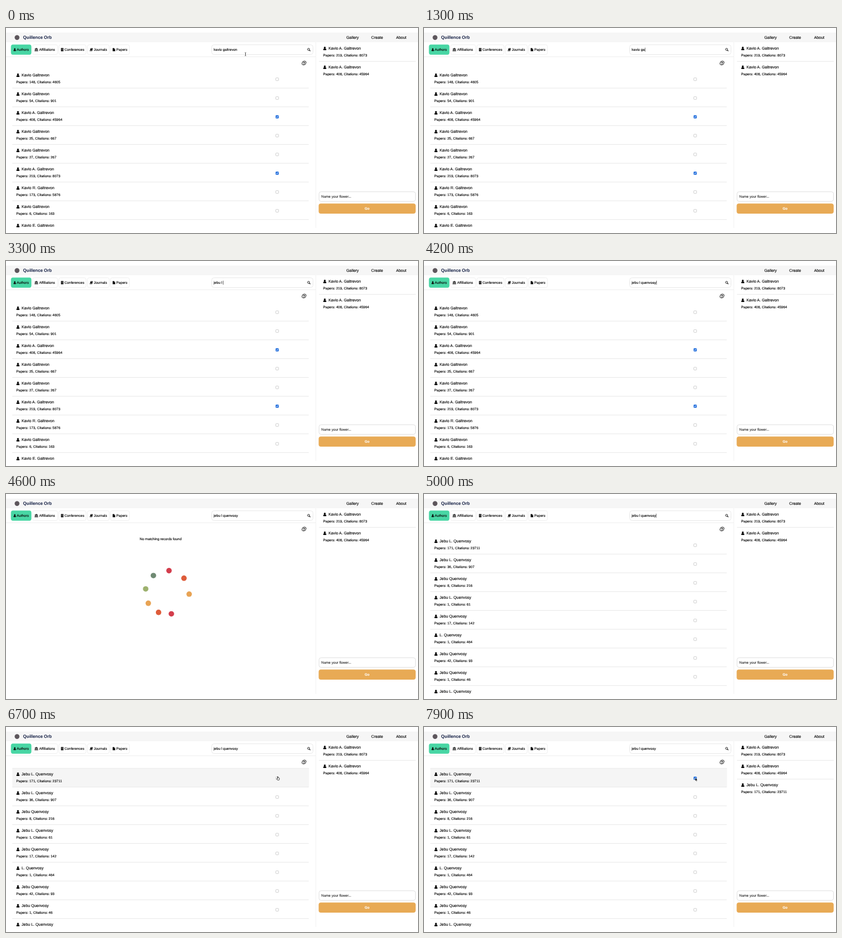
Write an HTML page with a canvas that moves like this. It is 720 by 360 pixels and loops after 8 s.

```html
<!DOCTYPE html>
<html lang="en">
<head>
<meta charset="utf-8">
<title>Author search</title>
<style>
html, body { margin: 0; width: 100%; height: 100%; overflow: hidden; background: #fff; }
canvas { display: block; width: 100vw; height: 100vh; }
</style>
</head>
<body>
<canvas id="stage"></canvas>
<script>
const W = 720, H = 360, LOOP = 8000;
const canvas = document.getElementById('stage');
const ctx = canvas.getContext('2d');
const FONT = '"Liberation Sans", Arial, sans-serif';
const INK = '#0a0a0a', RULE = '#e9e9e9', BORDER = '#e4e4e4';
const NAME = 6.85, BODY = 6.1;

const FIRST = 'Kavio', LAST = 'Galtrevon';
const firstResults = [
  ['', 148, 4605], ['', 54, 901], ['A. ', 408, 45964], ['', 25, 667], ['', 27, 267],
  ['A. ', 219, 8073], ['R. ', 173, 5876], ['', 6, 163], ['E. ', 12, 310]
].map(([mid, papers, cites]) => ({ name: `${FIRST} ${mid}${LAST}`, papers, cites }));
const secondResults = [
  ['Jebu L.', 171, 23711], ['Jebu L.', 36, 907], ['Jebu', 8, 216], ['Jebu L.', 1, 61], ['Jebu', 17, 142],
  ['L.', 1, 464], ['Jebu', 42, 93], ['Jebu', 1, 46], ['Jebu L.', 2, 18]
].map(([given, papers, cites]) => ({ name: `${given} Quenvosy`, papers, cites }));

const OLD_QUERY = 'kavio galtrevon';
const TYPED = 'jebu l quenvoay';
const KEY_TIMES = [1800, 1900, 2000, 2200, 2300, 2800, 3200, 3400, 3600, 3700, 3800, 3900, 4000, 4100, 4200];
const T = { focus: 400, erase: 1000, erased: 1600, load: 4500, loaded: 4800, pointer: 5400, arrive: 6300, check: 7400 };

// A hairline outline gives the small text its slightly heavier weight.
function text(str, x, y, size = BODY, color = INK, weight = 'normal', align = 'left') {
  ctx.font = `${weight} ${size}px ${FONT}`;
  ctx.textRendering = 'geometricPrecision';
  ctx.textAlign = align;
  ctx.fillStyle = ctx.strokeStyle = color;
  ctx.lineWidth = 0.14;
  ctx.fillText(str, x, y);
  ctx.strokeText(str, x, y);
}

function rect(x, y, w, h, color) {
  ctx.fillStyle = color;
  ctx.fillRect(x, y, w, h);
}

function box(x, y, w, h, r, fill, stroke) {
  ctx.beginPath();
  ctx.roundRect(x, y, w, h, r);
  if (fill) { ctx.fillStyle = fill; ctx.fill(); }
  if (stroke) { ctx.strokeStyle = stroke; ctx.lineWidth = 0.8; ctx.stroke(); }
}

function dot(x, y, r, color) {
  ctx.fillStyle = color;
  ctx.beginPath();
  ctx.arc(x, y, r, 0, Math.PI * 2);
  ctx.fill();
}

function path(points, color, width, fill) {
  ctx.beginPath();
  points.forEach(([x, y], i) => i ? ctx.lineTo(x, y) : ctx.moveTo(x, y));
  if (fill) { ctx.closePath(); ctx.fillStyle = fill; ctx.fill(); }
  if (width) { ctx.strokeStyle = color; ctx.lineWidth = width; ctx.stroke(); }
}

function at(x, y, scale, draw) {
  ctx.save();
  ctx.translate(x, y);
  ctx.scale(scale, scale);
  draw();
  ctx.restore();
}

// Icons are drawn around their own centre.
const icons = {
  user() {
    dot(0, -1.5, 1.65, INK);
    box(-2.75, 0, 5.5, 3, [1.9, 1.9, 0.9, 0.9], INK);
  },
  bank() {
    path([[-3.3, -1.3], [0, -3.1], [3.3, -1.3]], '', 0, INK);
    for (const x of [-2.5, -0.6, 1.3]) rect(x, -1.2, 1.2, 2.6, INK);
    rect(-3.3, 1.6, 6.6, 1.2, INK);
  },
  building() {
    rect(-2.3, -3, 4.6, 6, INK);
    for (const y of [-2, -0.6, 0.8]) for (const x of [-1.3, 0.5]) rect(x, y, 0.8, 0.7, '#fff');
  },
  book() {
    path([[-1.2, -2.6], [3, -2.6], [1.6, 2.5], [-2.9, 2.5]], '', 0, INK);
    path([[-0.4, -1.3], [1.6, -1.3]], '#fff', 0.5);
    path([[-2.1, 1.5], [1.1, 1.5]], '#fff', 0.5);
  },
  file() {
    path([[-2.3, -3], [0.4, -3], [0.4, -0.8], [2.4, -0.8], [2.4, 3], [-2.3, 3]], '', 0, INK);
    path([[0.9, -3], [2.4, -1.4], [0.9, -1.4]], '', 0, INK);
  },
  search() {
    ctx.beginPath();
    ctx.arc(-0.5, -0.5, 1.8, 0, Math.PI * 2);
    ctx.strokeStyle = INK;
    ctx.lineWidth = 0.9;
    ctx.stroke();
    path([[0.9, 0.9], [2.5, 2.5]], INK, 1.1);
  },
  help() {
    ctx.transform(1, 0, -0.2, 1, 0, 0);
    ctx.beginPath();
    ctx.arc(0, 0, 3.4, 0, Math.PI * 2);
    ctx.strokeStyle = INK;
    ctx.lineWidth = 0.9;
    ctx.stroke();
    text('?', 0, 2.1, 6, INK, 'bold', 'center');
  }
};
const icon = (name, x, y, scale = 1) => at(x, y, scale, icons[name]);

function header() {
  rect(0, 8, W, 17, '#f6f6f6');
  dot(19.3, 16.8, 4.2, '#5d565c');
  text('Quillence Orb', 29.8, 19.3, 7.65, '#2b3556', 'bold');
  text('Gallery', 594.8, 19.1, NAME);
  text('Create', 638.2, 19.1, NAME);
  text('About', 681.7, 19.1, NAME);
}

function toolbar() {
  const tabs = [
    ['Authors', 9, 35, 15.3, 18.8, 'user'], ['Affiliations', 46.4, 43.8, 53, 58, 'bank'],
    ['Conferences', 92.4, 47.4, 98.2, 102.2, 'building'], ['Journals', 142.4, 38, 149, 153.4, 'book'],
    ['Papers', 182.7, 33, 188.6, 192.8, 'file']
  ];
  tabs.forEach(([label, x, w, iconX, textX, glyph], i) => {
    box(x, 29.4, w, 17.2, 3, i ? '#fff' : '#48d6a4', i ? '#ebebeb' : '#48d6a4');
    icon(glyph, iconX, 38, i ? 0.95 : 0.8);
    text(label, textX, 40.2);
  });
  box(359.5, 29.5, 177, 17, 4, '#fff', BORDER);
  icon('search', 529.3, 38);
  rect(0, 50, 541, 1, '#efefef');
  icon('help', 520.8, 61.5);
}

function query(t) {
  if (t < T.erased) {
    const gone = Math.max(0, (t - T.erase) / (T.erased - T.erase));
    return OLD_QUERY.slice(0, Math.ceil(OLD_QUERY.length * (1 - gone)));
  }
  if (t < 4300) return TYPED.slice(0, KEY_TIMES.filter(k => k <= t).length);
  if (t < 4400) return TYPED.slice(0, -2);
  return TYPED.slice(0, -2) + (t < 4450 ? 's' : 'sy');
}

function searchField(t) {
  const str = query(t);
  text(str, 363, 40.2);
  if (t >= T.focus && Math.floor(t / 500) % 2 === 0) {
    rect(363 + ctx.measureText(str).width + 0.2, 34.6, 0.6, 7, INK);
  }
}

function entry(item, x, y) {
  icon('user', x + 2.9, y);
  text(item.name, x + 9.2, y + 2.4, NAME);
  text(`Papers: ${item.papers}, Citations: ${item.cites}`, x, y + 13.5);
}

function checkbox(x, y, on) {
  box(x - 2.4, y - 2.4, 4.8, 4.8, 0.7, on ? '#2b74de' : '#fff', on ? '#2b74de' : '#c4c4c4');
  if (on) path([[x - 1.4, y], [x - 0.4, y + 1.2], [x + 1.5, y - 1.4]], '#fff', 0.8);
}

function list(items, isChecked, hovered) {
  if (hovered) {
    rect(11, 72, 518.5, 33, '#f5f5f5');
    rect(11, 72, 518.5, 0.6, '#e6e6e6');
  }
  items.forEach((item, i) => {
    const y = 83 + 33 * i;
    entry(item, 18, y);
    checkbox(473.9, y + 7, isChecked(i));
    rect(11, y + 22, 518, 1, RULE);
  });
}

function loader(t) {
  text('No matching records found', 270.2, 81.2, BODY, INK, 'normal', 'center');
  const colors = ['#e8a354', '#de5c3a', '#d33d4c', '#6f8a73', '#9db16e'];
  const u = (t - 4600) / 100;
  for (let k = 0; k < 8; k++) {
    const p = u - k;
    const angle = (4 + 45 * p + 1.2 * Math.max(0, -p - 2) ** 2) * Math.PI / 180;
    dot(281.9 + 38.3 * Math.cos(angle), 172.8 + 38.3 * Math.sin(angle), 4.8, colors[k % 5]);
  }
}

function sidePanel(t) {
  rect(541, 25, 0.8, 327, '#efefef');
  const picked = [firstResults[5], firstResults[2]];
  if (t >= T.check) picked.push(secondResults[0]);
  picked.forEach((item, i) => {
    entry(item, 554.2, 36 + 33 * i);
    if (i) rect(547, 25 + 33 * i, 169, 1, RULE);
  });
  box(547, 287.6, 168.6, 16.8, 3.5, '#fff', '#d9d9d9');
  text('Name your flower...', 551, 298.3, BODY, '#333');
  box(546.4, 308.2, 169.5, 17.9, 4, '#e8aa55');
  text('Go', 631, 319.4, BODY, '#fff', 'bold', 'center');
}

function iBeam(x, y) {
  path([[x - 1.2, y - 3], [x, y - 2.4], [x + 1.2, y - 3]], INK, 0.6);
  path([[x, y - 2.4], [x, y + 2.4]], INK, 0.7);
  path([[x - 1.2, y + 3], [x, y + 2.4], [x + 1.2, y + 3]], INK, 0.6);
}

function arrow(x, y) {
  at(x, y, 1, () => path([[0, 0], [0, 5.6], [1.3, 4.5], [2.1, 6.4], [3, 6], [2.2, 4.2], [3.9, 4.1], [0, 0]], '#fff', 0.4, '#000'));
}

function hand(x, y) {
  at(x, y, 1, () => path([[-1.2, -3], [-0.3, -3], [0, -0.9], [2.1, -0.4], [2.4, 1], [1.7, 3.2],
    [-1, 3.2], [-2.6, 0.7], [-2, 0.2], [-1, 0.9], [-1.2, -3]], INK, 0.7, '#fff'));
}

const ease = p => p * p * (3 - 2 * p);
const clamp = p => Math.min(1, Math.max(0, p));

function pointerPos(t) {
  const p = ease(clamp((t - T.pointer) / (T.arrive - T.pointer)));
  return [418.5 + 57 * p, 39 + 51 * p];
}

function pointer(t) {
  if (t < T.erase) return iBeam(418.5, 46 - 7 * ease(clamp((t - 100) / 150)));
  if (t < T.pointer) return;
  const [x, y] = pointerPos(t);
  if (t >= T.check) arrow(x - 1.4, y - 0.8);
  else if (y > 84) hand(x, y);
  else if (y < 46) iBeam(x, y);
  else arrow(x, y);
}

function draw(t) {
  const dpr = window.devicePixelRatio || 1;
  const w = Math.round(innerWidth * dpr), h = Math.round(innerHeight * dpr);
  if (canvas.width !== w || canvas.height !== h) { canvas.width = w; canvas.height = h; }
  ctx.setTransform(w / W, 0, 0, h / H, 0, 0);
  rect(0, 0, W, H, '#fff');
  ctx.save();
  ctx.beginPath();
  ctx.rect(0, 8, W, 343);
  ctx.clip();
  header();
  toolbar();
  searchField(t);
  if (t < T.load) list(firstResults, i => i === 2 || i === 5, false);
  else if (t < T.loaded) loader(t);
  else list(secondResults, i => i === 0 && t >= T.check, t >= T.pointer && pointerPos(t)[1] > 72);
  sidePanel(t);
  pointer(t);
  ctx.restore();
}

const start = performance.now();
function tick() {
  draw((performance.now() - start) % LOOP);
  requestAnimationFrame(tick);
}
tick();
</script>
</body>
</html>
```
